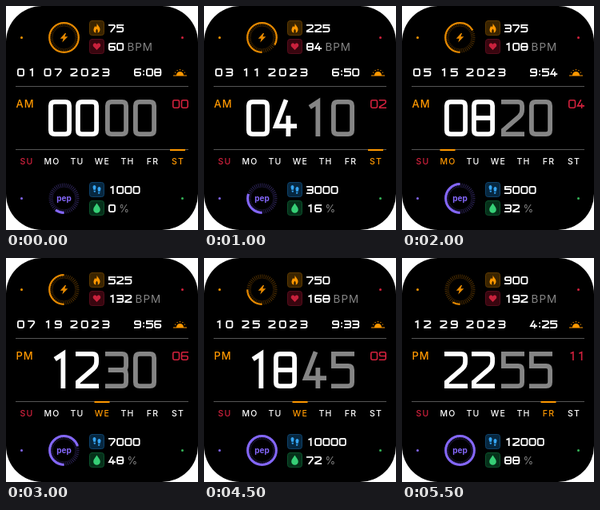
Write an HTML page with a canvas that moves like this. It is 240 by 280 pixels and loops after 6000 ms.

```html
<!DOCTYPE html>
<html lang="en">
<head>
<meta charset="utf-8">
<title>Watch face</title>
<style>
html, body { margin: 0; width: 100%; height: 100%; overflow: hidden; background: #fff; }
canvas { display: block; width: 240px; height: 280px; }
</style>
</head>
<body>
<canvas id="face"></canvas>
<script>
const canvas = document.getElementById('face');
const c = canvas.getContext('2d');
const ratio = window.devicePixelRatio || 1;
canvas.width = 240 * ratio;
canvas.height = 280 * ratio;
c.scale(ratio, ratio);
c.lineCap = 'square';

const STEP = 500, STEPS = 12;
const ORANGE = '#ff9800', AMBER = '#e68900', RED = '#d4213d', PURPLE = '#8467fa', GREY = '#858585', WHITE = '#fff';
const DAYS = ['SU', 'MO', 'TU', 'WE', 'TH', 'FR', 'ST'];
const SUN = ['6:08', '6:29', '6:50', '8:22', '9:54', '9:55', '9:56', '10:54', '10:13', '9:33', '6:59', '4:25'];

// Digit strokes: xy pairs on a grid 6 wide and 8 high, ! marks a sharp corner
const GLYPHS = [
  '30 60 68 08 00 30',
  '21 40! 48',
  '00 60 63 07! 08! 68',
  '00 60 64 14|14 64 68 08',
  '30 06! 66|44 48',
  '60 00! 03! 63 68 08',
  '60 00 08 68 64 04',
  '00 60 62 28',
  '30 60 68 08 00 30|04 64',
  '08 68 60 00 04 64'
];

const two = n => String(n).padStart(2, '0');

function digit(d, x, y, w, h, weight, color) {
  c.strokeStyle = color;
  c.lineWidth = weight;
  for (const part of GLYPHS[d].split('|')) {
    const pts = part.split(' ').map(p => [
      x + weight / 2 + p[0] / 6 * (w - weight),
      y + weight / 2 + p[1] / 8 * (h - weight),
      p[2] ? 0 : w * 0.17
    ]);
    c.beginPath();
    c.moveTo(pts[0][0], pts[0][1]);
    for (let i = 1; i < pts.length - 1; i++) {
      const [px, py, cut] = pts[i];
      const near = ([qx, qy]) => {
        const f = Math.min(cut / Math.hypot(qx - px, qy - py), 0.5);
        return [px + (qx - px) * f, py + (qy - py) * f];
      };
      c.lineTo(...near(pts[i - 1]));
      if (cut) c.quadraticCurveTo(px, py, ...near(pts[i + 1]));
    }
    const end = pts[pts.length - 1];
    c.lineTo(end[0], end[1]);
    c.stroke();
  }
}

// Returns the x after the last digit
function number(value, x, y, color = WHITE, pitch = 10.2, w = 9, h = 10, weight = 1.8) {
  for (const ch of String(value)) {
    if (ch === ':') {
      c.fillStyle = color;
      c.fillRect(x + 1, y + 2.5, 1.8, 1.8);
      c.fillRect(x + 1, y + 6.8, 1.8, 1.8);
      x += 4.8;
    } else {
      digit(+ch, x, y, w, h, weight, color);
      x += pitch;
    }
  }
  return x;
}

function label(text, x, y, font, color, align = 'left', gap = 1) {
  c.font = font + 'px Inter, sans-serif';
  c.letterSpacing = gap + 'px';
  c.textAlign = align;
  c.fillStyle = color;
  c.fillText(text, x, y);
}

function shape(path, x, y, color) {
  c.save();
  c.translate(x, y);
  c.fillStyle = color;
  c.fill(new Path2D(path));
  c.restore();
}

function dot(x, y, r, color) {
  c.fillStyle = color;
  c.beginPath();
  c.arc(x, y, r, 0, Math.PI * 2);
  c.fill();
}

function arc(x, y, r, part, weight, color, dash = []) {
  c.strokeStyle = color;
  c.lineWidth = weight;
  c.lineCap = 'butt';
  c.setLineDash(dash);
  c.beginPath();
  c.arc(x, y, r, Math.PI / 2, Math.PI / 2 + part * Math.PI * 2);
  c.stroke();
  c.setLineDash([]);
  c.lineCap = 'square';
}

// Gauge fills clockwise from the bottom
function gauge(y, part, weight, color, dim) {
  arc(72.5, y, 17, 1, 4, dim, [1, 1.4]);
  arc(72.5, y, 14.5, 1, 0.6, dim);
  arc(72.5, y, 19.4 - weight / 2, part, weight, color);
}

function badge(y, fill, edge, path, color) {
  c.beginPath();
  c.roundRect(104.5, y + 0.5, 18, 18, 3);
  c.fillStyle = fill;
  c.fill();
  c.strokeStyle = edge;
  c.lineWidth = 1;
  c.stroke();
  shape(path, 113.5, y + 9.5, color);
}

function sunrise() {
  shape('M-4.5 4A4.5 4.5 0 0 1 4.5 4ZM-8.5 4H8.5V5H-8.5Z', 217.5, 82.5, ORANGE);
  for (let i = 1; i < 6; i++) {
    const a = Math.PI * (1 + i / 6);
    dot(217.5 + Math.cos(a) * 6.8, 86.5 + Math.sin(a) * 6.8, 0.7, ORANGE);
  }
}

function draw(k) {
  c.clearRect(0, 0, 240, 280);
  c.fillStyle = '#000';
  c.beginPath();
  c.roundRect(0, 0, 240, 280, 45);
  c.fill();

  dot(19.5, 39.5, 1.5, ORANGE);
  dot(220.5, 39.5, 1.5, RED);
  dot(19.5, 240.5, 1.5, PURPLE);
  dot(220.5, 240.5, 1.5, '#35b558');

  gauge(39.5, 1 - k / 12, 2.2, AMBER, '#4d2e00');
  shape('M1.3-5.5L-4.8 1.3H-1L-2.2 6L4.8-1.3H1L2.6-5.5Z', 72.5, 39.5, AMBER);
  gauge(240.5, Math.min(1, (k + 1) / 10), 3, PURPLE, '#2b2354');
  label('pep', 72.5, 243.5, 'bold 10', PURPLE, 'center', 0);

  badge(18, '#3a2400', '#5c3900', 'M0-6C1-3 4.5-1 4 2.5C3.6 5 2 6 1 6C2 4 1 2 0 1C-1 2-2 4-1 6C-2.5 6-4.2 4.5-4 2C-3.8 0-2.8-1-2.2-2.5L-1-1C0-2.5 .3-4 0-6Z', ORANGE);
  badge(41, '#38060f', '#560d1c', 'M0 4.6L-4.4 0C-6-3.5-1.8-5.6 0-2.4C1.8-5.6 6-3.5 4.4 0Z', '#c9213c');
  badge(220, '#07273f', '#0d416a',
    'M-5-3C-5-6.5-1-6.5-1-3L-1.6 .2H-4.2ZM-4 1.2H-1.6C-1 4-4 4-4 1.2ZM1-1C1-4.5 5-4.5 5-1L4.2 2.2H1.6ZM1.6 3.2H4C4 6 1 6 1.6 3.2Z', '#35a5f5');
  badge(243, '#06301a', '#0b512b', 'M0-6C2-3 4.3-.5 4.3 2A4.3 4.3 0 0 1-4.3 2C-4.3-.5-2-3 0-6Z', '#36cf76');

  number(75 * (k + 1), 128, 23);
  label('BPM', number(60 + 12 * k, 128, 46) + 3, 56, 13.5, GREY);
  number(1000 * (k + 1), 128, 225);
  label('%', number(8 * k, 128, 248) + 3, 258, 13, GREY);

  const day = 7 + 2 * k;
  number(two(k + 1), 14, 78, WHITE, 13.3);
  number(two(day), 47.5, 78, WHITE, 13.3);
  number(2023, 80.5, 78, WHITE, 13.3);
  number(SUN[k], 160, 78);
  sunrise();

  c.fillStyle = '#555';
  c.fillRect(12, 100, 216, 1);
  c.fillRect(12, 179, 216, 1);

  label(k < 6 ? 'AM' : 'PM', 12.5, 126.5, '500 13', ORANGE);
  number(two(k), 208, 117, RED, 10.7, 9.3, 11, 1.6);
  number(two(2 * k), 53, 117, WHITE, 34, 29, 46, 5.8);
  number(two(5 * k), 124, 117, GREY, 35, 29, 46, 5.8);

  const today = new Date(2023, k, day).getDay();
  DAYS.forEach((name, i) => {
    const x = 25.5 + 31.5 * i;
    const color = i === today ? ORANGE : i ? WHITE : RED;
    label(name, x + 0.5, 198, '500 10.5', color, 'center', 1.2);
    if (i === today) {
      c.fillStyle = ORANGE;
      c.fillRect(x - 9.5, 179, 19, 2);
    }
  });
}

const start = performance.now();
function tick() {
  draw(Math.floor((performance.now() - start) / STEP) % STEPS);
  requestAnimationFrame(tick);
}
tick();
</script>
</body>
</html>
```
